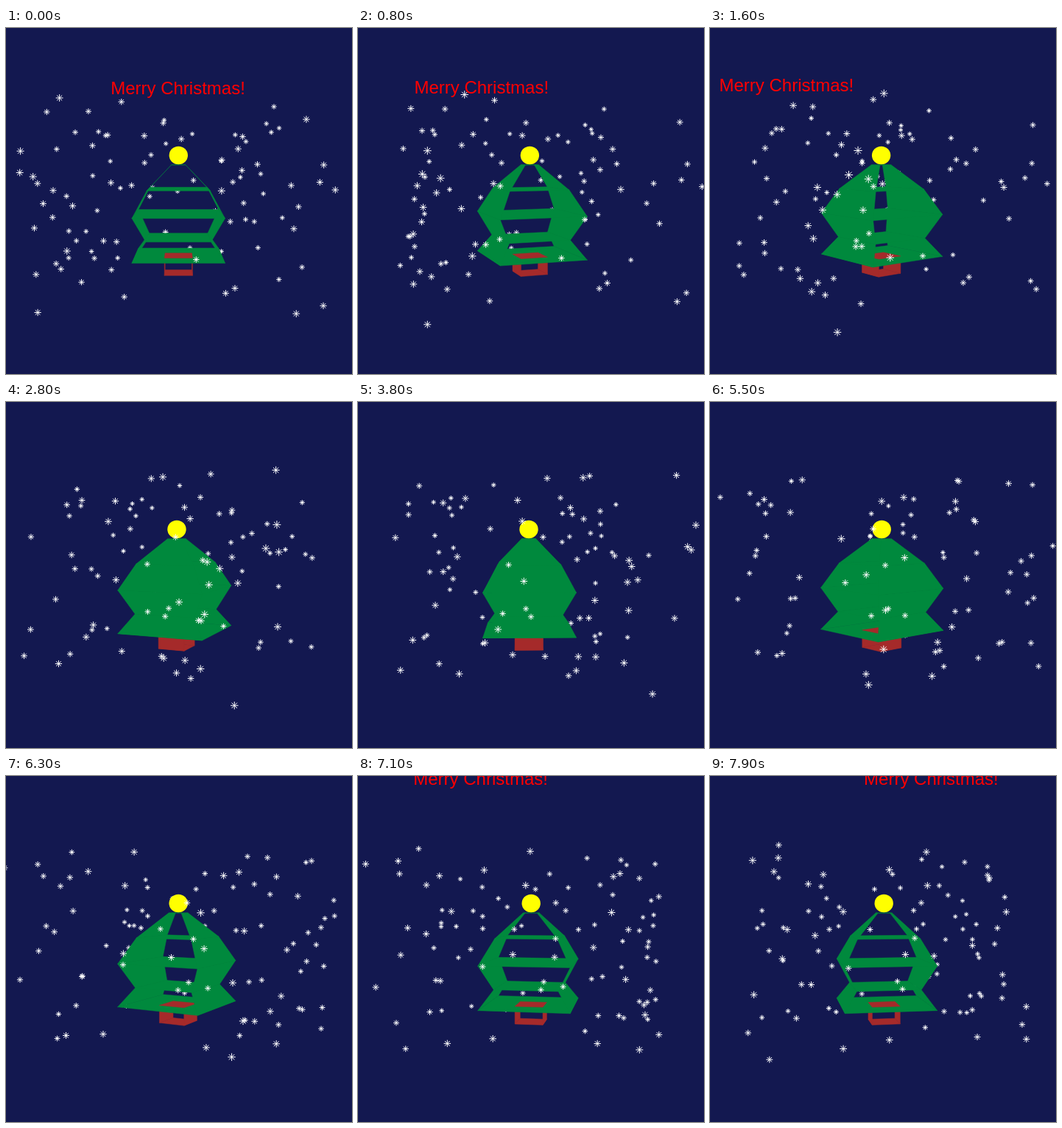
An HTML page with a canvas for the animation above (8 s loop, 470 by 470 pixels).

```html
<!DOCTYPE html>
<html lang="en">
<head>
<meta charset="utf-8">
<title>Christmas tree</title>
<style>
  html, body { margin: 0; width: 100%; height: 100%; overflow: hidden; background: #131850; }
  canvas { display: block; }
</style>
</head>
<body>
<canvas id="stage" width="470" height="470"></canvas>
<script>
const ctx = document.getElementById('stage').getContext('2d');

const LOOP = 8000, STEP = 100, TURN = 2.4;   // degrees per step
const CX = 235, CY = 173, DEPTH = 770;
const AXIS = { x: -0.7, z: -3 };             // the tree stands slightly off the axis
const SKY = '#131850', GREEN = '#00893d', BROWN = '#a52a2a';

// [half width, height below the eye]
const TREE = [[9.7, 13], [41, 45.8], [58.7, 79.5], [42, 111.8], [58.7, 136]];
const TRUNK = [[18.7, 136.6], [18.7, 160]];

const GREETING = { text: 'Merry Christmas!', y: -101.4, z: -265 };

const STARS = [
  [-160, 178, 128], [127, 171.5, 156], [166, 173, 118], [66.5, 158, 96],
  [-70, 181, 45], [-171, 86, 100], [-128, -61.5, 163], [-167.5, -55, 52],
  [-120.5, -58.5, 16], [-71, -66, 71], [141.5, -40, 140], [138.5, -71, -57],
  [138, -50, -125], [-24, -57, -147], [22, -35.5, -170], [174, 38.5, 139],
  [166, 11, 120], [134.5, 86, 106], [134, 36, 93], [45, 37.5, 171],
  [-167, -4.5, 173], [-170.5, 18.5, 163], [-154, 22.5, 172], [-147, 41, 108],
  [-122, 58, 120], [-157, 77, 66], [-120, 102.5, 163], [-156.5, 138, 48],
  [176, 160, -41], [149, 185, -75], [-90, 152.5, 15]
];

let seed = 24;
const random = (lo, hi) => {
  seed = (seed * 1664525 + 1013904223) % 4294967296;
  return lo + (hi - lo) * seed / 4294967296;
};
while (STARS.length < 98) {
  STARS.push([random(-178, 178), random(-45, 165), random(-180, 110)]);
}

let sin = 0, cos = 1;

function project(x, y, z) {
  const depth = z * cos - x * sin;
  const scale = DEPTH / (DEPTH - depth);
  return { x: CX + (x * cos + z * sin) * scale, y: CY + y * scale, scale, depth };
}

function fill(points, color) {
  ctx.fillStyle = ctx.strokeStyle = color;
  ctx.lineWidth = 0.5;
  ctx.beginPath();
  for (const [x, y, z] of points) {
    const p = project(x + AXIS.x, y, z + AXIS.z);
    ctx.lineTo(p.x, p.y);
  }
  ctx.closePath();
  ctx.fill();
  ctx.stroke();
}

function cap([a, y], color) {
  fill([[-a, y, -a], [a, y, -a], [a, y, a], [-a, y, a]], color);
}

// Only the two side walls exist; front and back stay open.
function wall(levels, side, color) {
  for (let i = 1; i < levels.length; i++) {
    const [a, top] = levels[i - 1], [b, low] = levels[i];
    fill([[side * a, top, -a], [side * a, top, a],
          [side * b, low, b], [side * b, low, -b]], color);
  }
}

function drawTree() {
  const near = sin > 0 ? -1 : 1;
  wall(TRUNK, -near, BROWN);
  cap(TRUNK[1], BROWN);
  wall(TRUNK, near, BROWN);
  wall(TREE, -near, GREEN);
  TREE.forEach(level => cap(level, GREEN));
  cap(TRUNK[0], BROWN);
  wall(TREE, near, GREEN);

  const top = project(AXIS.x, 0, AXIS.z);
  ctx.fillStyle = '#ff0';
  ctx.beginPath();
  ctx.ellipse(top.x, top.y, 12.7, 12.2, 0, 0, Math.PI * 2);
  ctx.fill();
}

function drawStars(stars) {
  ctx.strokeStyle = '#fff';
  ctx.lineWidth = 1;
  ctx.beginPath();
  for (const { x, y, scale } of stars) {
    for (let i = 0; i < 4; i++) {
      const r = 3.9 * scale;
      const dx = r * Math.cos(i * Math.PI / 4), dy = r * Math.sin(i * Math.PI / 4);
      ctx.moveTo(x - dx, y - dy);
      ctx.lineTo(x + dx, y + dy);
    }
  }
  ctx.stroke();
}

function drawGreeting() {
  const p = project(0, GREETING.y, GREETING.z);
  ctx.font = '24px "Liberation Sans", Arial, sans-serif';
  ctx.fillStyle = '#f00';
  const left = p.x - 1.5 - ctx.measureText(GREETING.text).width / 2;
  // Hidden as a whole once it would cross the left edge.
  if (left >= 0) ctx.fillText(GREETING.text, left, p.y - 7.6);
}

function draw(now) {
  const angle = Math.floor((now % LOOP) / STEP) * TURN * Math.PI / 180;
  sin = Math.sin(angle);
  cos = Math.cos(angle);
  ctx.fillStyle = SKY;
  ctx.fillRect(0, 0, 470, 470);
  const stars = STARS.map(s => project(...s));
  drawStars(stars.filter(s => s.depth < 0));
  drawTree();
  drawStars(stars.filter(s => s.depth >= 0));
  drawGreeting();
}

const start = performance.now();
function tick() {
  draw(performance.now() - start);
  requestAnimationFrame(tick);
}
tick();
</script>
</body>
</html>
```
